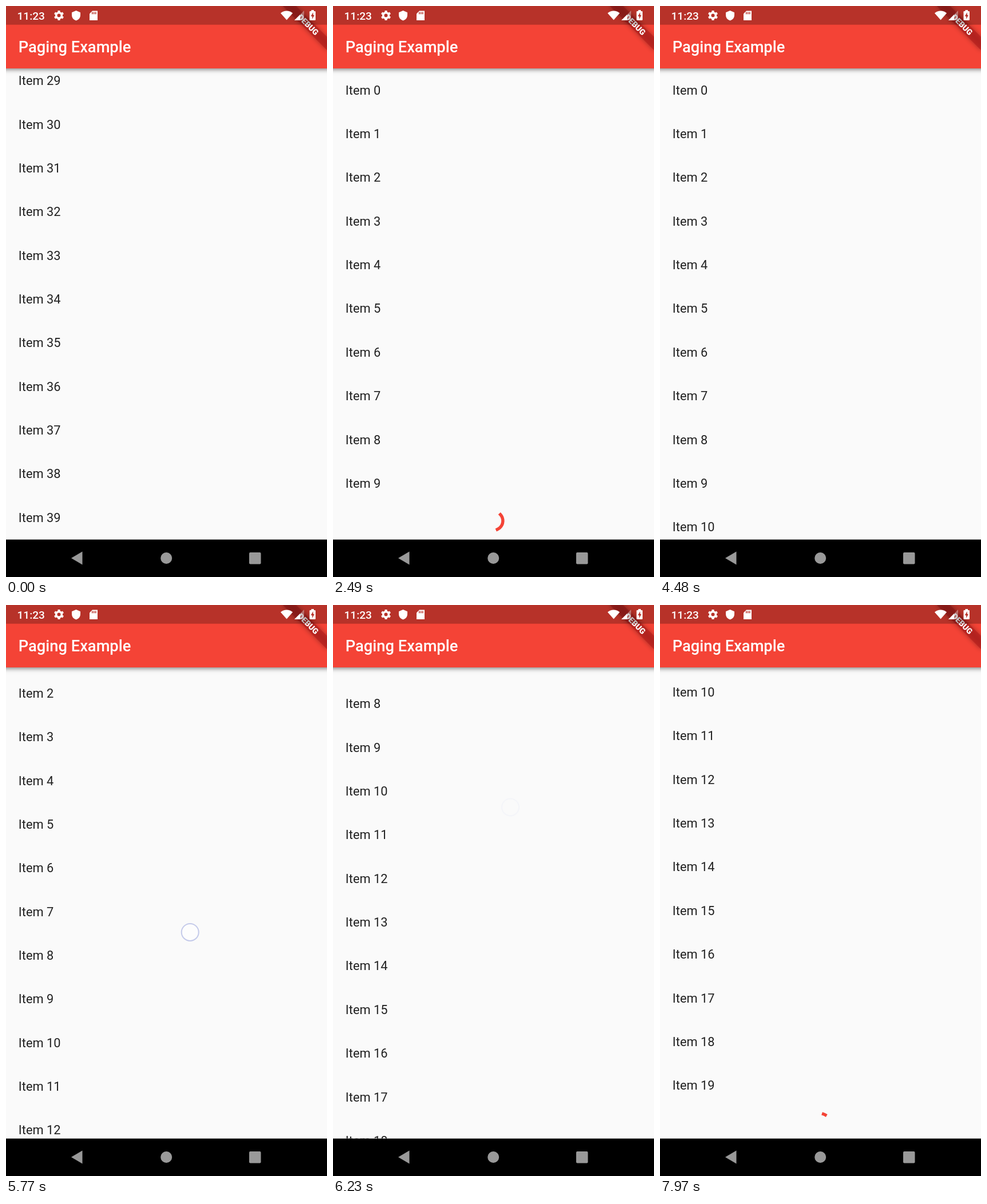
Recreate the animation shown at these times as an HTML page with a canvas. Size 561 px wide and 998 px high, loop 8000 ms.

```html
<!DOCTYPE html>
<html lang="en">
<head>
<meta charset="utf-8">
<title>Paging Example</title>
<style>
  html, body { margin: 0; width: 100%; height: 100%; overflow: hidden; background: #fafafa; }
  canvas { display: block; }
</style>
</head>
<body>
<canvas id="stage" width="561" height="998"></canvas>
<script>
const ctx = document.getElementById('stage').getContext('2d');
const W = 561, H = 998, LOOP = 8000;
const DP = W / 411.43;
const BAR = 24 * DP, TOP = 80 * DP, BOTTOM = H - 48 * DP;
const VIEW = BOTTOM - TOP, ROW = 56 * DP, LOADER = 40 * DP;
const RED = '#f44336', SCRIM = '#b73229';

// Phases of the list: number of rows, start of the loader's clock (null: no loader).
const PHASES = [
  { from: 0, rows: 40, loader: null },
  { from: 520, rows: 0, loader: 530 },
  { from: 2335, rows: 10, loader: 2335 },
  { from: 4475, rows: 20, loader: 6105 }
];

const TOUCH = 5440, DRAG = 5515, LIFT = 6100, IMPACT = 6405;
const TOUCH_Y = 742, SLOP = 18 * DP;
const END = 20 * ROW + LOADER - VIEW;

const clamp = (v, lo = 0, hi = 1) => Math.min(hi, Math.max(lo, v));
const span = (t, a, b) => clamp((t - a) / (b - a));

function hermite(t, t0, t1, y0, y1, v0, v1) {
  const d = t1 - t0, u = span(t, t0, t1), w = 1 - u;
  return y0 * (1 + 2 * u) * w * w + v0 * d * u * w * w
       + y1 * u * u * (3 - 2 * u) - v1 * d * u * u * w;
}

// Cubic bezier (.4, 0, .2, 1)
function fastOutSlowIn(x) {
  if (x <= 0 || x >= 1) return clamp(x);
  let lo = 0, hi = 1;
  for (let i = 0; i < 24; i++) {
    const m = (lo + hi) / 2, n = 1 - m;
    if (1.2 * n * n * m + 0.6 * n * m * m + m * m * m < x) lo = m; else hi = m;
  }
  return lo * lo * (3 - 2 * lo);
}

function scrollAt(t) {
  if (t < PHASES[1].from) return 40 * ROW - VIEW;
  if (t < DRAG) return 0;
  if (t < 5770) return hermite(t, DRAG, 5770, 0, 145, 0.4, 0.5);
  if (t < LIFT) return hermite(t, 5770, LIFT, 145, 364, 0.5, 1.6);
  const u = span(t, LIFT, LIFT + 749);
  return Math.min(END, 364 + 500 * (3.065 * u - 3.27 * u * u + 1.2 * u * u * u));
}

function polygon(color, ...points) {
  ctx.fillStyle = color;
  ctx.beginPath();
  points.forEach(([x, y]) => ctx.lineTo(x, y));
  ctx.closePath();
  ctx.fill();
}

function disc(color, x, y, r) {
  ctx.fillStyle = color;
  ctx.beginPath();
  ctx.arc(x, y, r, 0, 7);
  ctx.fill();
}

function rect(color, x, y, w, h) {
  ctx.fillStyle = color;
  ctx.fillRect(x, y, w, h);
}

function text(str, x, y, size, weight, color) {
  ctx.font = `${weight} ${size * DP}px Roboto, sans-serif`;
  ctx.fillStyle = color;
  ctx.fillText(str, x, y);
}

function drawLoader(y, elapsed) {
  const s = Math.max(0, elapsed) / 1000, p = s % 1, step = Math.floor(s) % 5;
  const head = fastOutSlowIn(p * 2), tail = fastOutSlowIn(p * 2 - 1);
  const start = Math.PI * (-0.5 + tail * 1.5 + p * 1.7 - step * 0.8);
  const sweep = Math.max((head - tail) * 1.5 * Math.PI, 0.01);
  ctx.strokeStyle = RED;
  ctx.lineWidth = 4 * DP;
  ctx.lineCap = 'square';
  ctx.beginPath();
  ctx.arc(W / 2, y, 12 * DP, start, start + sweep);
  ctx.stroke();
}

function drawGlow(t) {
  if (t < IMPACT || t > IMPACT + 610) return;
  const left = (1 - span(t, IMPACT + 10, IMPACT + 610)) ** 2;
  const r = W * 1.5, depth = W * 0.201;
  ctx.save();
  ctx.translate(0, BOTTOM);
  ctx.scale(1, -0.2 * left);
  disc(`rgba(244,67,54,${0.3 * left})`, W / 2, depth - r, r);
  ctx.restore();
}

function drawList(t) {
  const phase = PHASES.filter(p => t >= p.from).pop();
  const scroll = scrollAt(t);
  ctx.save();
  ctx.beginPath();
  ctx.rect(0, TOP, W, VIEW);
  ctx.clip();
  for (let i = 0; i < phase.rows; i++) {
    const y = TOP + (i + 0.5) * ROW - scroll;
    if (y > TOP - ROW && y < BOTTOM + ROW) text('Item ' + i, 16 * DP, y + 7.4, 16, 400, '#212121');
  }
  if (phase.loader !== null) {
    drawLoader(TOP + phase.rows * ROW + LOADER / 2 - scroll, t - phase.loader);
  }
  drawGlow(t);
  ctx.restore();
}

function drawTouch(t) {
  if (t < TOUCH || t > LIFT + 150) return;
  const y = TOUCH_Y - SLOP * span(t, TOUCH, DRAG) - scrollAt(Math.min(t, LIFT));
  const x = 310 + 37 * ((y - 353) / 389) ** 2;
  ctx.globalAlpha = 1 - span(t, LIFT, LIFT + 150);
  disc('rgba(255,255,255,.6)', x, y, 15);
  ctx.strokeStyle = 'rgba(178,186,228,.75)';
  ctx.lineWidth = 2;
  ctx.beginPath();
  ctx.arc(x, y, 15, 0, 7);
  ctx.stroke();
  ctx.globalAlpha = 1;
}

function drawBanner() {
  ctx.save();
  ctx.translate(W, 0);
  ctx.rotate(Math.PI / 4);
  ctx.shadowColor = 'rgba(0,0,0,.5)';
  ctx.shadowBlur = 6 * DP;
  rect('rgba(183,28,28,.63)', -40 * DP, 28 * DP, 80 * DP, 12 * DP);
  ctx.shadowColor = 'transparent';
  ctx.textAlign = 'center';
  text('DEBUG', 0, 37.6 * DP, 10.2, 900, '#fff');
  ctx.restore();
}

function drawAppBar() {
  ctx.save();
  ctx.shadowColor = 'rgba(0,0,0,.5)';
  ctx.shadowBlur = 8;
  ctx.shadowOffsetY = 2;
  rect(RED, -20, -20, W + 40, TOP + 20);
  ctx.restore();
  text('Paging Example', 16 * DP, 80.5, 20, 500, '#fff');
  drawBanner();
  rect('rgba(0,0,0,.25)', 0, 0, W, BAR);
}

function drawGear(x, y) {
  ctx.strokeStyle = '#fff';
  ctx.lineCap = 'butt';
  ctx.lineWidth = 3.6;
  ctx.beginPath();
  ctx.arc(x, y, 4.8, 0, 7);
  ctx.stroke();
  ctx.lineWidth = 4;
  ctx.beginPath();
  for (let i = 0; i < 6; i++) {
    const a = (i + 0.5) * Math.PI / 3, c = Math.cos(a), s = Math.sin(a);
    ctx.moveTo(x + 5 * c, y + 5 * s);
    ctx.lineTo(x + 8.6 * c, y + 8.6 * s);
  }
  ctx.stroke();
}

function drawStatus() {
  const white = '#fff';
  text('11:23', 19.5, 24, 14, 500, white);
  drawGear(92.5, 16.5);

  ctx.fillStyle = white;
  ctx.fill(new Path2D('M122.5 8 L130 11.3 V16 Q130 23 122.5 25.5 Q115 23 115 16 V11.3 Z'));

  polygon(white, [151, 8.5], [160, 8.5], [160, 25], [146, 25], [146, 13.5]);
  for (const x of [150, 153, 156]) rect(SCRIM, x, 10.5, 1.6, 3.8);

  ctx.fillStyle = white;
  ctx.beginPath();
  ctx.moveTo(490.5, 24.5);
  ctx.arc(490.5, 24.5, 16, -Math.PI / 2 - 0.72, -Math.PI / 2 + 0.72);
  ctx.fill();

  polygon('rgba(255,255,255,.35)', [504, 25], [521, 8], [521, 25]);
  polygon(white, [504, 25], [514, 15], [514, 25]);

  rect(white, 533.5, 7, 4.5, 3);
  ctx.beginPath();
  ctx.roundRect(530.5, 9, 10.5, 16, 1.2);
  ctx.fill();
  polygon(SCRIM, [536.7, 11], [532.8, 18], [535.2, 18], [535.2, 23], [539, 15.8], [536.7, 15.8]);
}

function drawNav() {
  const gray = '#999';
  rect('#000', 0, BOTTOM, W, H - BOTTOM);
  polygon(gray, [114, 965], [133.5, 953.5], [133.5, 976.5]);
  disc(gray, 280.2, 965, 10);
  ctx.fillStyle = gray;
  ctx.beginPath();
  ctx.roundRect(425, 955, 20.5, 20.5, 2);
  ctx.fill();
}

function draw(t) {
  rect('#fafafa', 0, 0, W, H);
  drawList(t);
  drawAppBar();
  drawStatus();
  drawNav();
  drawTouch(t);
}

const began = performance.now();
function tick() {
  draw((performance.now() - began) % LOOP);
  requestAnimationFrame(tick);
}
tick();
</script>
</body>
</html>
```
